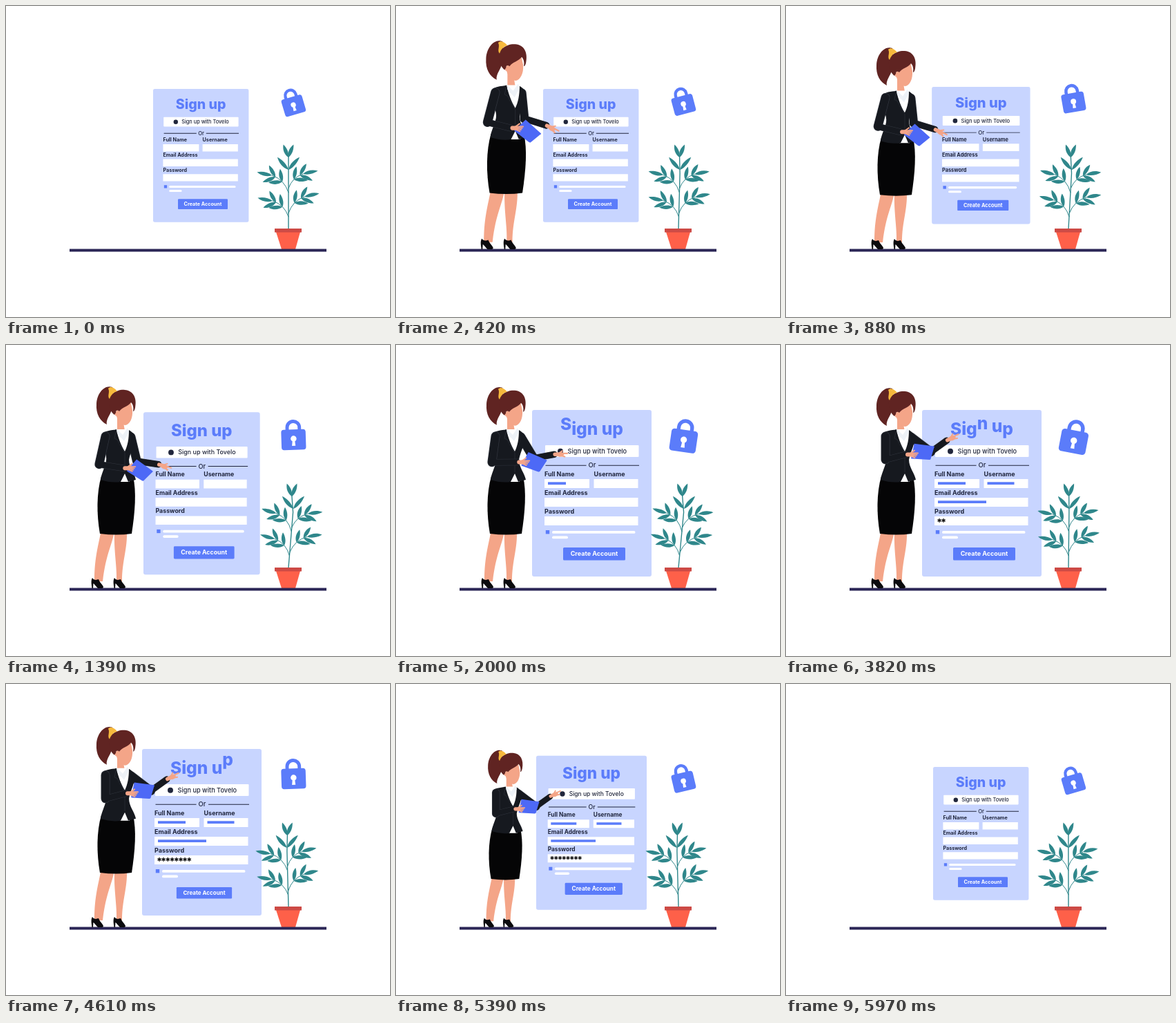
Animation of 556 by 450 pixels, one loop 6000 ms. Source, as an HTML page with a canvas:

```html
<!DOCTYPE html>
<html lang="en">
<head>
<meta charset="utf-8">
<title>Sign up</title>
<style>
  html, body { margin: 0; width: 100%; height: 100%; overflow: hidden; background: #fff; }
  canvas { display: block; width: 556px; height: 450px; }
</style>
</head>
<body>
<canvas id="stage"></canvas>
<script>
const W = 556, H = 450, LOOP = 6000, TAU = Math.PI * 2;
const FONT = 'Inter, "Open Sans", sans-serif';
const BLUE = '#5b7cfa', PALE = '#c8d5ff', INK = '#20263c', SKIN = '#f4a588',
      HAIR = '#602422', SUIT = '#16191f', SEAM = '#30343d', TEAL = '#2f878b';
const canvas = document.getElementById('stage');
const ctx = canvas.getContext('2d');
const dpr = window.devicePixelRatio || 1;
canvas.width = W * dpr;
canvas.height = H * dpr;

const clamp = v => Math.max(0, Math.min(1, v));
const part = (t, from, to) => clamp((t - from) / (to - from));
const smooth = x => x * x * (3 - 2 * x);
const mix = (a, b, p) => a + (b - a) * p;
const polar = ([x, y], r, a) => [x + r * Math.cos(a), y + r * Math.sin(a)];
function elastic(x) {
  if (x <= 0) return 0;
  if (x >= 1) return 1;
  return 1 + 2 ** (-10 * x) * Math.sin((10 * x - 0.75) * TAU / 3);
}

function box(x, y, w, h, color, r = 0) {
  ctx.fillStyle = color;
  ctx.beginPath();
  ctx.roundRect(x, y, w, h, r);
  ctx.fill();
}
function oval(x, y, rx, ry, color) {
  ctx.fillStyle = color;
  ctx.beginPath();
  ctx.ellipse(x, y, rx, ry, 0, 0, TAU);
  ctx.fill();
}
function shape(d, color) {
  ctx.fillStyle = color;
  ctx.fill(new Path2D(d));
}
function line(points, width, color) {
  ctx.lineWidth = width;
  ctx.strokeStyle = color;
  ctx.lineCap = ctx.lineJoin = 'round';
  ctx.beginPath();
  points.forEach(([x, y]) => ctx.lineTo(x, y));
  ctx.stroke();
}
function text(str, x, y, size, weight, color, align = 'left') {
  ctx.font = `${weight} ${size}px ${FONT}`;
  ctx.fillStyle = color;
  ctx.textAlign = align;
  ctx.fillText(str, x, y);
}
// Draws in a frame moved to (x, y), turned and scaled
function at(x, y, turn, size, draw) {
  ctx.save();
  ctx.translate(x, y);
  ctx.rotate(turn);
  ctx.scale(size, size);
  draw();
  ctx.restore();
}
const scaled = (x, y, s, draw) => at(x, y, 0, s, () => {
  ctx.translate(-x, -y);
  draw();
});

// Form

function title(t) {
  const head = (t - 1715) * 0.00207 - 1;
  let x = 238, i = 0;
  for (const ch of 'Sign up') {
    const lift = ch === ' ' ? 0 : 12 * Math.max(0, 1 - Math.abs(head - i++));
    text(ch, x, 130 - lift, 24.5, 800, BLUE);
    x += ctx.measureText(ch).width;
  }
}

function field(label, x, y, w, fill, from, to, t) {
  text(label, x, y - 4.5, 9, 650, INK);
  box(x, y, w, 13, '#fff');
  ctx.globalAlpha = 1 - part(t, 5450, 5950);
  const p = part(t, from, to);
  if (fill) box(x + 5, y + 4.3, fill * p, 3.8, BLUE);
  else for (let i = 0; i < Math.floor(8 * p); i++) {
    text('*', x + 7 + i * 6.2, y + 13.6, 14, 800, '#111', 'center');
  }
  ctx.globalAlpha = 1;
}

function form(t) {
  box(197, 94, 173, 241, PALE, 3);
  title(t);
  box(216, 145, 135.5, 17, '#fff', 1);
  oval(238, 153.7, 4, 4, INK);
  text('Sign up with Tovelo', 248.5, 156.8, 9.2, 500, INK);
  box(216.5, 173.8, 59, 1, INK);
  box(293, 173.8, 59, 1, INK);
  text('Or', 284, 177.4, 9.5, 500, INK, 'center');
  field('Full Name', 215, 194, 65, 40, 1650, 2190, t);
  field('Username', 286.5, 194, 64, 39, 2190, 2730, t);
  field('Email Address', 215, 221, 135.5, 70, 2740, 3500, t);
  field('Password', 215, 248, 135.5, 0, 3550, 4300, t);
  box(216.8, 268, 5.4, 5.4, BLUE);
  box(226, 269, 120.5, 3.8, '#fff', 1.9);
  box(226, 276.5, 23, 3.8, '#fff', 1.9);
  const press = 1 - 0.12 * Math.sin(Math.PI * part(t, 4450, 4900));
  scaled(287, 302.3, press, () => {
    box(242, 293, 90, 18.6, BLUE, 1.5);
    text('Create Account', 287, 305.4, 9, 700, '#fff', 'center');
  });
}

// Padlock

function lock(t) {
  const c = Math.cos(TAU * t / LOOP);
  const y = 140.6 + 3.7 * Math.cos(2 * TAU * t / LOOP);
  at(416.4, y, -16.5 * c * Math.PI / 180, 1 - 0.14 * c, () => {
    ctx.lineWidth = 5;
    ctx.lineCap = 'butt';
    ctx.strokeStyle = BLUE;
    ctx.stroke(new Path2D('M-9 -13V-18A9 9 0 0 1 9 -18V-13'));
    box(-18, -15, 36, 30, BLUE, 4);
    oval(0, -1.5, 4.3, 4.3, '#fff');
    shape('M-1.6 0H1.6L2.6 9H-2.6Z', '#fff');
  });
}

// Plant

function leaf([x, y], angle, len) {
  at(x, y, angle, 1, () => {
    ctx.fillStyle = TEAL;
    ctx.beginPath();
    ctx.moveTo(0, 0);
    ctx.bezierCurveTo(len * 0.3, -4.4, len * 0.7, -3.8, len, 0);
    ctx.bezierCurveTo(len * 0.7, 2.8, len * 0.3, 3.6, 0, 0);
    ctx.fill();
  });
}

function plant(t) {
  const sway = 5.5 * (Math.sin(TAU * (t - 500) / LOOP) + 0.5);
  const bend = (x, y) => {
    const h = (322 - y) / 87;
    return [x + sway * (h < 1 ? h : Math.max(0.2, 2.6 - 1.6 * h)), y + sway * (x - 409) / 110];
  };
  const lean = sway / 87;

  const branch = (y, dx, dy) => {
    const side = Math.sign(dx);
    const spot = u => bend(409 + dx * u * (0.5 + 0.5 * u), y - dy * u * (1.5 - 0.5 * u));
    line([0, 0.25, 0.5, 0.75, 1].map(spot), 1, TEAL);
    const dir = u => Math.atan2(-dy * (1.5 - u), dx * (0.5 + u)) + lean;
    leaf(spot(1), dir(1) + side * 0.12, 22);
    for (const u of [0.5, 0.85]) {
      leaf(spot(u), dir(u) - side * 0.6, 19);
      leaf(spot(u), dir(u) + side * 0.85, 20);
    }
  };

  line([322, 295, 268, 242, 217].map(y => bend(409, y)), 1.4, TEAL);
  branch(264, 21, 21);
  branch(270, -24, 25);
  branch(300, 23, 24);
  branch(305, -23, 23);
  [[219, 0.38], [237, 0.72]].forEach(([y, spread]) => {
    for (const side of [-1, 1]) leaf(bend(409, y), -TAU / 4 + side * spread, 15 + spread * 13);
  });
  shape('M391 327H426L419 352H399Z', '#fe6049');
  box(389, 322, 39, 5.6, '#cd4a45');
}

// Woman

function sleeve(shoulder, elbow, wrist) {
  line([shoulder, elbow], 13, SEAM);
  line([elbow, wrist], 9.5, SEAM);
  line([shoulder, elbow], 11.5, SUIT);
  line([elbow, wrist], 8.5, SUIT);
}

function rightArm(p) {
  const shoulder = [181, 133];
  const aim = mix(0.92, 0.1, p), bent = 0.55;
  const elbow = polar(shoulder, 36, aim + bent);
  const wrist = polar(shoulder, mix(57, 52, p), aim);
  sleeve(shoulder, elbow, wrist);
  at(...wrist, mix(0.44, -0.47, p), 1, () => {
    line([[1, 0], [7, 0]], 5.5, SKIN);
    oval(9, 0.6, 5, 3.4, SKIN);
    line([[9, -1], [19, -0.4]], 2.2, SKIN);
    line([[9, 2], [15, 4]], 2.2, SKIN);
    line([[8, -2], [12, -4.5]], 2, SKIN);
  });
}

function leftArm(p) {
  const tx = mix(190, 198, p) + 6 * Math.sin(Math.PI * p), ty = mix(187, 154.5, p);
  const wx = tx - 25, wy = ty + mix(-5, 4, p);
  sleeve([144, 132], [mix(133, 144, p), mix(174, 166, p)], [wx, wy]);
  at(tx, ty, mix(0.66, 0.06, p), 1, () =>
    shape('M-13 -11L16 -9Q17 -8 16 -7L12 10Q11 11 10 11H-15Q-17 11 -16 9Z', '#4d69f6'));
  line([[wx + 3, wy], [wx + 8, wy]], 6, SKIN);
  for (let i = 0; i < 4; i++) {
    line([[wx + 8, wy - 2 + i * 1.4], [wx + 18 - i * 1.5, wy - 2 + i * 2.2]], 1.9, SKIN);
  }
  line([[wx + 6, wy - 1], [wx + 13, wy - 6]], 2, SKIN);
}

function head() {
  shape('M154 63C143 59 132 71 131 87C130 102 136 112 146 117C144 108 155 100 156 84Z', HAIR);
  shape('M161 104V126Q166 131 172 126L170 114Z', SKIN);
  shape('M160 98C156 98 156 103 160 105C162 113 168 118 173 118C179 117 184 108 183 96L180 82L164 88Z', SKIN);
  shape('M149 86C148 74 160 66 172 67C184 68 190 78 187 93C186 97 185 98 184 98C185 93 184 88 181 85C177 91 168 92 164 98C162 96 159 96 159 100L157 103C152 99 149 93 149 86Z', HAIR);
  shape('M148 65C152 61 157 64 161 69C156 70 152 74 150 80C146 76 151 70 148 65Z', '#f6b93d');
}

function legs() {
  shape('M138 268H157C154 290 145 300 140 342H128C128 312 132 296 138 268Z', SKIN);
  shape('M157 268H175C176 296 168 312 168 342H160C161 320 156 300 157 268Z', SKIN);
  for (const x of [124, 156]) {
    at(x, 0, 0, 1, () =>
      shape('M1 337C4 341 7 340 10 339C12 344 16 347 17 350Q17 352 14 352H9C6 349 4 346 2.5 345L2 352H0.5C0 347 -1.5 341 1 337Z', '#0b0b0e'));
  }
}

function woman(p) {
  legs();
  shape('M138 190H184C189 212 187 240 182 273Q160 276 136 273C131 245 131 214 138 190Z', '#050506');
  at(0, -2.5 * (1 - p), 0, 1, head);
  rightArm(p);
  shape('M158 122H178L179 198H164Z', '#fff');
  shape('M160 122C153 124 142 123 139 130C138 146 147 158 145 168C143 178 138 186 137 195Q152 200 166 198L172 186L177 198L188 195C186 185 178 177 178 166C180 154 188 142 186 131C184 127 181 125 178 123C178 136 176 146 172 154C167 146 162 134 160 122Z', SUIT);
  shape('M160 121L169 130L176 120L178 126L171 139L161 128Z', '#eef2f7');
  line([[159, 126], [157, 135], [161, 137], [172, 156], [172, 184]], 0.6, SEAM);
  leftArm(p);
}

function draw(t) {
  ctx.setTransform(dpr, 0, 0, dpr, 0, 0);
  ctx.fillStyle = '#fff';
  ctx.fillRect(0, 0, W, H);

  const size = 0.8 + 0.2 * (smooth(part(t, 690, 1590)) - smooth(part(t, 5016, 5916)));
  scaled(277, 224, size, () => form(t));
  lock(t);
  plant(t);
  box(92, 351.6, 372, 4, '#2b2656');

  const pop = t < 3000 ? elastic((t - 20) / 1000) : elastic((5870 - t) / 1550);
  if (pop > 0) scaled(150, 352, pop, () => woman(smooth(part(t, 800, 3100))));
}

function tick() {
  draw(performance.now() % LOOP);
  requestAnimationFrame(tick);
}
tick();
</script>
</body>
</html>
```
